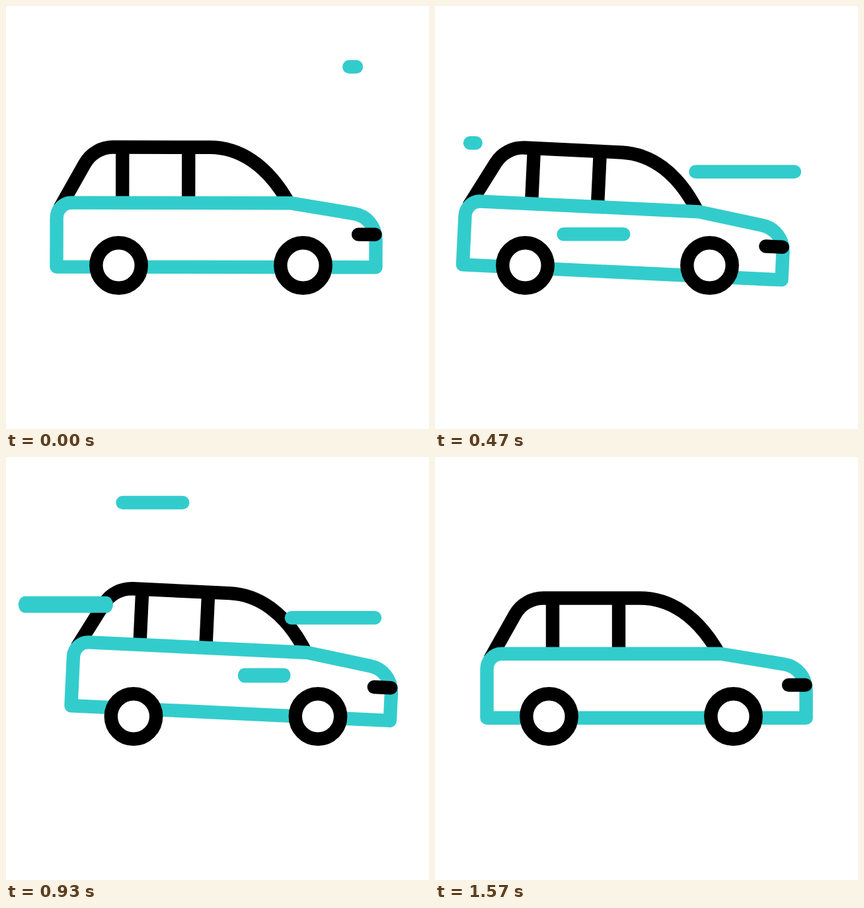
Recreate the animation shown at these times as an HTML page. Size 640 px wide and 640 px high, loop 1.67 s.

```html
<!DOCTYPE html>
<html lang="en">
<head>
<meta charset="utf-8">
<title>Driving car</title>
<style>
  html, body { margin: 0; width: 100%; height: 100%; overflow: hidden; background: #fff; }
  svg { display: block; width: 100%; height: 100%; }
  path, circle { fill: none; stroke: #000; stroke-width: 20.4; }
  circle { fill: #fff; }
  .shell { stroke: #33cccc; stroke-linejoin: round; }
  .lamp { stroke-linecap: round; }
  #stripes { fill: #33cccc; }
</style>
</head>
<body>
<svg viewBox="0 0 640 640">
  <g id="body">
    <path d="M83 306L121 238.5C130 222.5 146.5 213.5 164 213.5H310C356 213.5 395 241 424 288L428 295"/>
    <path d="M178 213V298M278 213V298"/>
    <path class="shell" d="M78.5 394.7V321C78.5 308 88.5 297.7 101 297.7H432L528 313.5C547.5 316.5 561.5 333 561.5 353V394.7Z"/>
    <path class="lamp" d="M535 345H560.5"/>
  </g>
  <g id="wheels">
    <circle cx="172.5" cy="392.5" r="34.2"/>
    <circle cx="451.5" cy="392.5" r="34.2"/>
  </g>
  <g id="stripes"></g>
</svg>
<script>
const LOOP = 1670, FPS = 30, LAST = 47;
const CAP = 10.2;              // radius of a stripe's ends
const GLIDE = 10, DELAY = 5.4; // ticks an end travels, ticks the tail waits

const $ = id => document.getElementById(id);

// Eased progress from 0 to 1 between two ticks.
function move(n, start, end) {
  const p = Math.min(1, Math.max(0, (n - start) / (end - start)));
  return p * p * (3 - 2 * p);
}

function drawCar(n) {
  const x = -58 * move(n, -1.2, 9.6) + 101 * move(n, 9.6, 24.2)
    - 64 * move(n, 24.2, 33.7) + 21 * move(n, 33.7, 46.8);
  const y = 8.7 * move(n, -1.3, 10.3) - 16.9 * move(n, 13, 23) + 8.2 * move(n, 25.2, 37.3);
  const tilt = 2.73 * (move(n, -1.4, 11.3) - move(n, 27, 41));

  $("wheels").setAttribute("transform", `translate(${x})`);
  $("body").setAttribute("transform", `translate(${x} ${y}) rotate(${tilt} 320 378)`);
}

// A stripe whose head runs from right to left and whose tail follows.
function stripe(y, right, left, start, half = CAP) {
  const bar = document.createElementNS("http://www.w3.org/2000/svg", "rect");
  const set = attrs => Object.entries(attrs).forEach(([key, v]) => bar.setAttribute(key, v));
  set({ y: y - half, height: 2 * half, rx: CAP, ry: half });
  $("stripes").append(bar);

  const place = n => right + (left - right) * move(n, start, start + GLIDE);
  return n => {
    const head = place(n), span = place(n - DELAY) - head;
    set({ x: head - CAP, width: span > 1 ? span + 2 * CAP : 0 });
  };
}

const stripes = [
  stripe(92, 530, 329, -1.4),
  stripe(207.2, 290, 53, -0.25),
  stripe(250.8, 589, 380, 5.6),
  stripe(345.3, 394, 194.5, 3.3),
  stripe(69, 376, 176.5, 17.3),
  stripe(223.3, 228, 28, 18.4, 12.5),
  stripe(330.4, 562, 361, 16.2, 11),
  stripe(243.2, 559.5, 358, 22.1)
];

// Motion advances in steps of 1/30 s and rests at the end of the loop.
function tick() {
  const t = performance.now() % LOOP;
  const n = Math.min(LAST, Math.floor((t + 3.4) * FPS / 1000));
  drawCar(n);
  stripes.forEach(draw => draw(n));
  requestAnimationFrame(tick);
}
tick();
</script>
</body>
</html>
```
